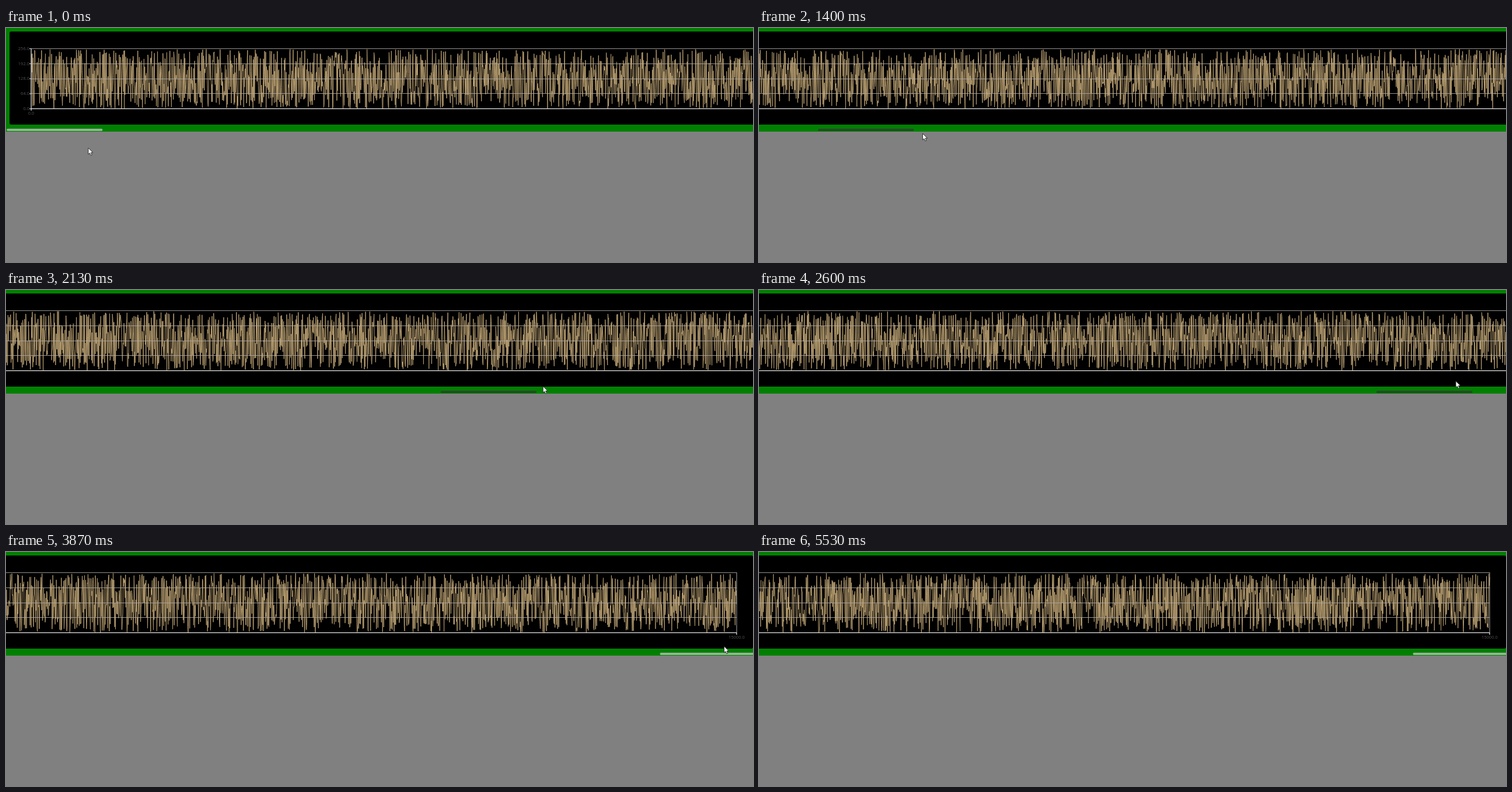
Write an HTML page with a canvas that moves like this. It is 1280 px wide and 402 px high and loops after 6.79 s.

```html
<!DOCTYPE html>
<html lang="en">
<head>
<meta charset="utf-8">
<title>Scrolling noise chart</title>
<style>
  html, body { margin: 0; width: 100%; height: 100%; overflow: hidden; background: #808080; }
  canvas { display: block; }
</style>
</head>
<body>
<canvas width="1280" height="402"></canvas>
<script>
const ctx = document.querySelector('canvas').getContext('2d');
const LOOP = 6790, STEP = 200 / 3;
const VIEW = 1286, CONTENT = 10012, POINTS = 15000;
const LEFT = 43, RIGHT = 9978, TOP = 35.5, BOTTOM = 138.7;

// [time, x, y]
const pointerKeys = [
  [200, 141, 206], [470, 126, 176], [670, 113, 157], [870, 107, 171], [930, 106.5, 172],
  [1070, 106.5, 172], [1270, 190, 179], [1500, 350, 183], [1730, 547, 178.5], [1800, 614, 181],
  [2130, 918, 165.5], [2400, 1095, 159], [2600, 1194, 156.5], [2800, 1230.5, 162],
  [4070, 1230.5, 162], [4330, 1080, 190], [4600, 700, 262], [4800, 451, 313], [5130, 340, 405]
];
// [time, thumb offset]
const thumbKeys = [
  [1070, 0], [1200, 25], [1400, 100], [1730, 331], [2130, 741], [2400, 948], [2600, 1057], [2800, 1119.5]
];

function noise(seed) {
  return Array.from({ length: POINTS }, () => {
    seed = (Math.imul(seed, 1664525) + 1013904223) >>> 0;
    return seed / 2 ** 32;
  });
}
const firstData = noise(7), secondData = noise(91);

function sample(keys, t) {
  if (t <= keys[0][0]) return keys[0].slice(1);
  const i = keys.findIndex(k => k[0] > t);
  if (i < 0) return keys[keys.length - 1].slice(1);
  const a = keys[i - 1], b = keys[i], p = (t - a[0]) / (b[0] - a[0]);
  return a.slice(1).map((v, j) => v + (b[j + 1] - v) * p);
}

function box(x, y, w, h, color, radius = 0) {
  ctx.fillStyle = color;
  ctx.beginPath();
  ctx.roundRect(x, y, w, h, radius);
  ctx.fill();
}

function drawSeries(data, scroll) {
  const gap = (RIGHT - LEFT) / (POINTS - 1);
  const from = Math.max(0, Math.floor((scroll - LEFT) / gap) - 2);
  const to = Math.min(POINTS, from + Math.ceil(1280 / gap) + 5);
  ctx.beginPath();
  for (let i = from; i < to; i++) {
    ctx.lineTo(LEFT + i * gap - scroll, BOTTOM - data[i] * (BOTTOM - TOP - 1));
  }
  ctx.strokeStyle = '#b49b6e';
  ctx.lineWidth = 1;
  ctx.lineJoin = 'bevel';
  ctx.stroke();
}

function drawChart(data, scroll) {
  const start = LEFT - scroll, end = RIGHT - scroll;
  box(6 - scroll, 6, CONTENT - 12, 160, '#000', 3);
  drawSeries(data, scroll);

  ctx.font = '7.5px "Noto Sans", sans-serif';
  ctx.textBaseline = 'middle';
  ctx.textAlign = 'right';
  for (let i = 0; i < 5; i++) {
    const y = TOP + i * (BOTTOM - TOP) / 4;
    box(start, Math.round(y - 0.5), end - start, 1, 'rgba(175,172,168,.85)');
    box(start - 3, y - 0.5, 3, 1, '#ddd');
    ctx.fillStyle = '#4a4a4a';
    ctx.fillText((256 - i * 64).toFixed(1), start - 3, y + 0.2);
  }
  box(start - 0.5, TOP - 0.5, 1.3, 107, '#ddd');
  box(end - 0.5, TOP - 0.5, 1, 104, '#aaa');
  box(start, BOTTOM - 0.7, end - start, 1.3, '#e4e4e4');
  box(end - 0.7, BOTTOM, 1.3, 3.5, '#ddd');

  ctx.textAlign = 'center';
  ctx.fillStyle = '#4a4a4a';
  ctx.fillText('0.0', start, 147);
  ctx.fillText('15000.0', end, 147);
}

function drawPointer(x, y) {
  ctx.save();
  ctx.translate(x, y);
  ctx.fillStyle = '#fff';
  ctx.strokeStyle = '#222';
  ctx.lineWidth = 0.9;
  ctx.fill(arrow);
  ctx.stroke(arrow);
  ctx.restore();
}
const arrow = new Path2D('M0 0V11L2.5 8.7L4.4 12.8L6.3 12L4.5 8H8Z');

function draw(time) {
  const t = Math.floor((time % LOOP + 4) / STEP) * STEP;
  const [thumb] = sample(thumbKeys, t);
  const scroll = thumb / 1119.5 * (CONTENT - VIEW);
  const dragging = t > 1060 && t < 3860;

  box(0, 0, 1280, 402, '#808080');
  box(0, 0, 1280, 178, '#008000');
  drawChart(t < 5520 ? firstData : secondData, scroll);
  box(1 + thumb, 173, 164.5, 4, dragging ? '#234a23' : '#92b592', 2);
  if (t < 5120) drawPointer(...sample(pointerKeys, t));
}

const origin = performance.now();
function tick() {
  draw(performance.now() - origin);
  requestAnimationFrame(tick);
}
tick();
</script>
</body>
</html>
```
